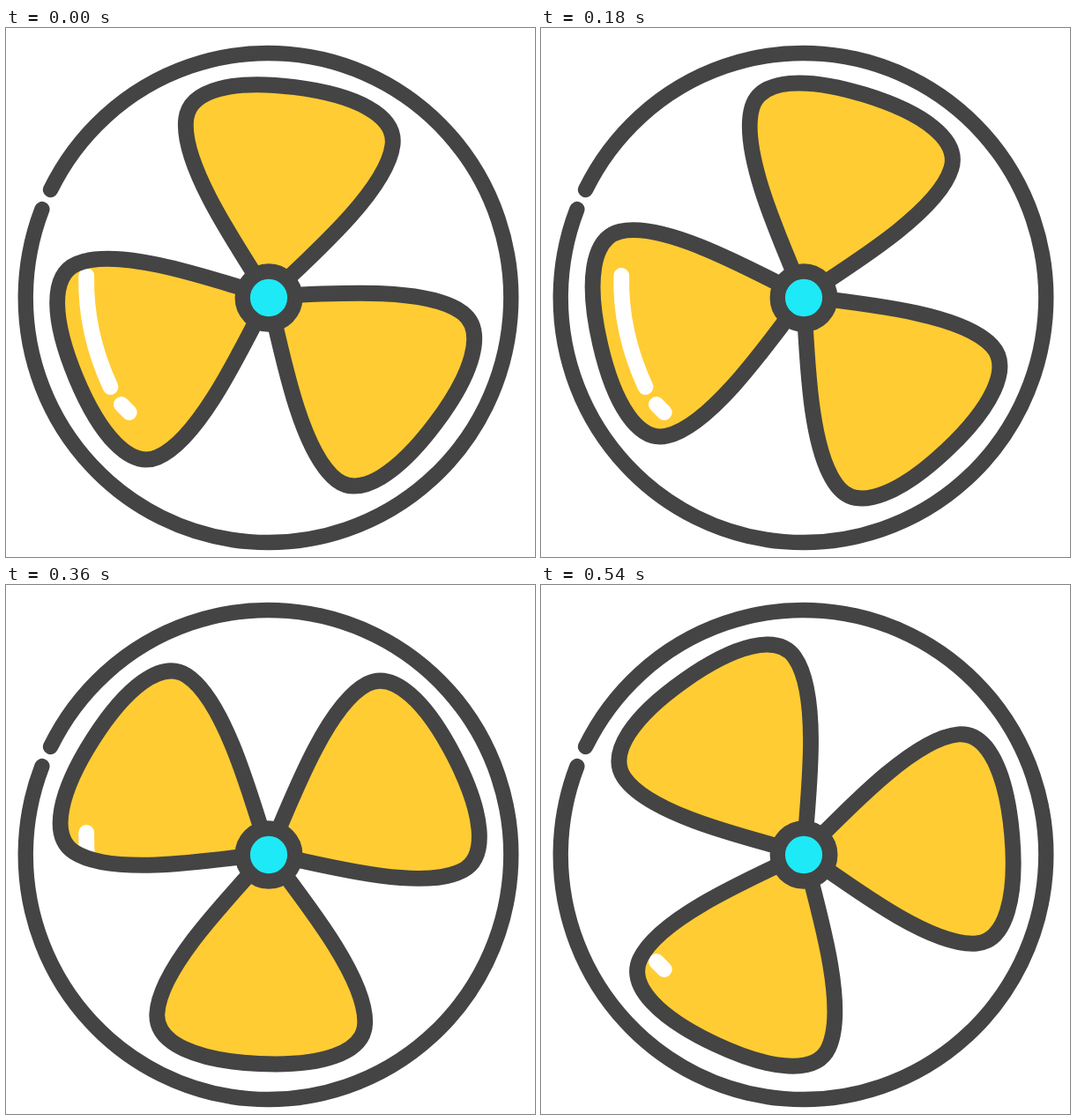
Animation, 600 px wide and 600 px high, one loop 0.61 s. Source, as an HTML page:

```html
<!DOCTYPE html>
<html>
<head>
<meta charset="utf-8">
<style>
  html, body { margin: 0; height: 100%; overflow: hidden; background: #fff; }
  svg { display: block; width: 100vw; height: 100vh; }
</style>
</head>
<body>
<svg viewBox="0 0 600 600" fill="none" stroke-linecap="round" stroke-linejoin="round">
  <defs>
    <path id="blade" d="M0 0C55-65 119-140 119-188C119-222 70-239 0-239S-119-222-119-188C-119-140-55-65 0 0Z"/>
    <g id="fan">
      <use href="#blade"/>
      <use href="#blade" transform="rotate(120)"/>
      <use href="#blade" transform="rotate(240)"/>
    </g>
  </defs>
  <!-- The whole fan is slightly narrower than it is tall -->
  <g transform="translate(2.4 0) scale(.992 1)">
    <circle r="277.500" transform="translate(297.500 306) rotate(206.200)" pathLength="360"
      stroke-dasharray="355 5" stroke="#444" stroke-width="17.500"/>
    <use class="spin" href="#fan" fill="#fc3"/>
    <path d="M89.500 281Q88 345 117 407M129.500 427L138.500 436" stroke="#fff" stroke-width="18"/>
    <use class="spin" href="#fan" stroke="#444" stroke-width="18"/>
    <circle cx="298" cy="306" r="30" fill="#1ee9f6" stroke="#444" stroke-width="17.500"/>
  </g>
</svg>
<script>
  const LOOP = 610, STEP = 30, LAST = 18;
  // [step, degrees]; one loop turns the fan by 840 degrees
  const keys = [[0, 7.2], [4, 166.7], [8, 350.7], [10, 445], [12, 542.7], [14, 636], [18, 805], [19, 847.2]];
  const TURN = 840, STEPS = 19;
  const n = keys.length - 1;
  const spinners = document.querySelectorAll('.spin');

  // Key at any index, continuing past both ends of the loop
  function key(i) {
    const lap = Math.floor(i / n);
    const [s, a] = keys[i - lap * n];
    return [s + lap * STEPS, a + lap * TURN];
  }

  function slope(i) {
    const [s0, a0] = key(i - 1), [s1, a1] = key(i + 1);
    return (a1 - a0) / (s1 - s0);
  }

  // Smooth (Hermite) angle between neighbouring keys
  function angleAt(step) {
    let i = 0;
    while (key(i + 1)[0] <= step) i++;
    const [s0, a0] = key(i), [s1, a1] = key(i + 1);
    const d = s1 - s0, u = (step - s0) / d, v = 1 - u;
    return a0 * v * v * (1 + 2 * u) + a1 * u * u * (1 + 2 * v)
      + d * u * v * (v * slope(i) - u * slope(i + 1));
  }

  function draw() {
    const step = Math.min(LAST, Math.floor(performance.now() % LOOP / STEP));
    const pose = `translate(298 304.3) rotate(${angleAt(step)})`;
    spinners.forEach(el => el.setAttribute('transform', pose));
    requestAnimationFrame(draw);
  }
  draw();
</script>
</body>
</html>
```
